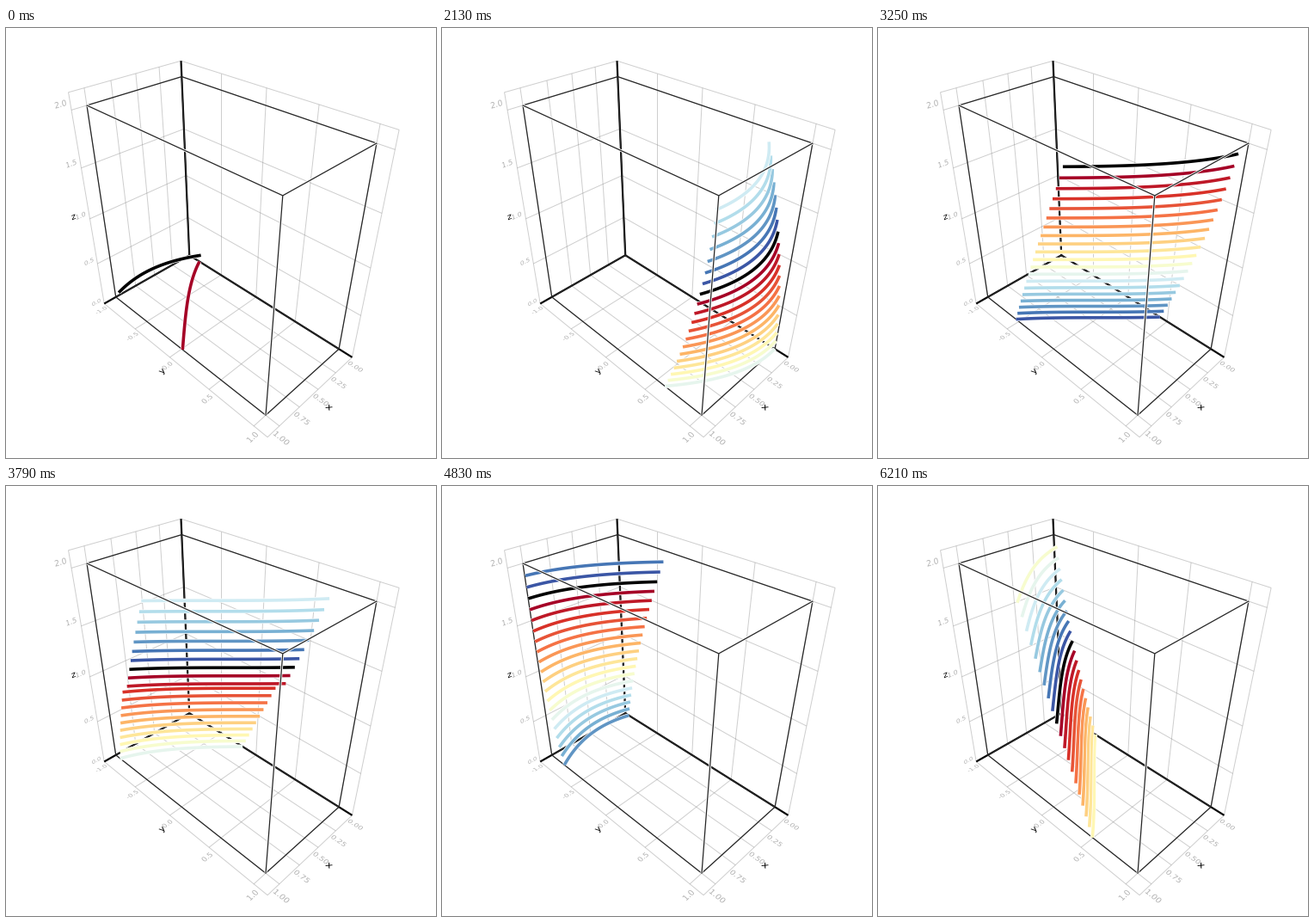
Animation, 500 px wide and 500 px high, one loop 6250 ms. Source, as a matplotlib script:

```python
import itertools

import numpy as np
import matplotlib
import matplotlib.pyplot as plt
from matplotlib import patheffects
from matplotlib.animation import FuncAnimation
from matplotlib.collections import LineCollection
from matplotlib.patches import PathPatch
from matplotlib.path import Path
from matplotlib.textpath import TextPath

SIZE, DPI = 500, 100
PX = 72 / DPI  # one pixel in points
LOOP_MS, TICK_MS = 6250, 25
STEP_RATE = 24  # wave steps per second
TRAIL, RISE = 20, 0.1

LOW = np.array([0.0, -1.0, 0.0])
HIGH = np.array([1.0, 1.0, 2.0])
LIMIT = HIGH + 0.14

# Perspective camera looking down the (1, 1, 1) diagonal
FOCAL, DISTANCE = 616, 4.403
FOCUS = np.array([0.57, 0.07, 0.9875])
RIGHT = np.array([-1, 1, 0]) / np.sqrt(2)
UP = np.array([-1, -1, 2]) / np.sqrt(6)
TOWARD = np.ones(3) / np.sqrt(3)

X, Y, Z = np.eye(3)


def project(points):
    rel = np.atleast_2d(points) - FOCUS
    scale = FOCAL / (DISTANCE - rel @ TOWARD)
    return np.c_[SIZE / 2 + scale * (rel @ RIGHT),
                 SIZE / 2 - scale * (rel @ UP)]


fig = plt.figure(figsize=(SIZE / DPI, SIZE / DPI), dpi=DPI, facecolor="white")
ax = fig.add_axes([0, 0, 1, 1])
ax.set_xlim(0, SIZE)
ax.set_ylim(SIZE, 0)
ax.axis("off")


def halo(width):
    return [patheffects.Stroke(linewidth=width * PX, foreground="white"),
            patheffects.Normal()]


def draw_segments(ends, color, width, zorder, **style):
    ax.add_collection(LineCollection([project(pair) for pair in ends], colors=color,
                                     linewidths=width * PX, zorder=zorder, **style))


def flat_text(text, center, right, up, em):
    """Outline of text lying in the plane spanned by right and up."""
    path = TextPath((0, 0), text, size=em)
    box = path.get_extents()
    flat = path.vertices - [(box.x0 + box.x1) / 2, (box.y0 + box.y1) / 2]
    return Path(project(center + flat @ np.array([right, up])), path.codes)


def draw_texts(paths, color):
    ax.add_patch(PathPatch(Path.make_compound_path(*paths),
                           fc=color, ec="none", zorder=3))


def draw_grid():
    lines = []
    for i, j in itertools.permutations(range(3), 2):
        for tick in [*np.linspace(LOW[i], HIGH[i], 5), LIMIT[i]]:
            start = LOW.copy()
            start[i] = tick
            end = start.copy()
            end[j] = LIMIT[j]
            lines.append((start, end))
    draw_segments(lines, (0.5, 0.5, 0.5, 0.38), 1.0, 1)
    axes = [(LOW, np.where(axis, LIMIT, LOW)) for axis in np.eye(3, dtype=bool)]
    draw_segments(axes, "#0a0a0a", 2.2, 2)


def draw_labels():
    em, ticks = 0.064, []
    for s in np.linspace(0, 1, 5):
        x, y, z = LOW + s * (HIGH - LOW)
        ticks += [flat_text(f"{x:.2f}", (x + 0.07, 1.22, 0), Y, -X, em),
                  flat_text(f"{y:.1f}", (1.22, y + 0.058, 0), -X, -Y, em),
                  flat_text(f"{z:.1f}", (1.222, -1, z + 0.07), -X, Z, em)]
    draw_texts(ticks, "#b0b0b0")
    em = 0.082
    draw_texts([flat_text("x", (0.585, 1.31, 0), Y, -X, em),
                flat_text("y", (1.29, 0.084, 0), -X, -Y, em),
                flat_text("z", (1.29, -1, 1.085), -X, Z, em)], "black")


def draw_box():
    corners = np.array(list(itertools.product(*zip(LOW, HIGH))))
    edges = [(a, b) for a, b in itertools.combinations(corners, 2)
             if np.count_nonzero(a != b) == 1]
    near = [e for e in edges if np.array_equal(e[1], HIGH)]
    far = [e for e in edges if not np.array_equal(e[1], HIGH)]
    draw_segments(far, "#262626", 1.25, 4)
    draw_segments(near, "#262626", 1.25, 50, path_effects=halo(3.0))


draw_grid()
draw_labels()
draw_box()

# The wave follows a real-time clock that stalls now and then: (step, seconds)
START = -2.158
STALLS = [(0, 1.17), (1, 0.17), (19, 0.08), (20, 0.12), (55, 0.085), (82, 0.07), (125, 0.053)]

U = np.linspace(0, 1, 100)
COLORS = ["black", *matplotlib.colormaps["RdYlBu"](np.linspace(0, 1, TRAIL))[:-1]]
curves = [ax.plot([], [], lw=3.6 * PX, solid_capstyle="butt", zorder=10 + age,
                  path_effects=halo(5.0))[0] for age in range(TRAIL)]


def phase(step):
    return START + step / STEP_RATE + sum(lag for at, lag in STALLS if step >= at)


def update(frame):
    # latest wave step that begins within this tick
    step = (3 * frame + 2) // 5
    for age, curve in enumerate(curves):
        born = step - age
        if born < -1:
            curve.set_data([], [])
            continue
        xy = project(np.c_[U, np.sin(U + phase(born)), np.full_like(U, RISE * age)])
        curve.set_data(xy[:, 0], xy[:, 1])
        curve.set_color(COLORS[(born + 1) % TRAIL])
    return curves


anim = FuncAnimation(fig, update, frames=LOOP_MS // TICK_MS, interval=TICK_MS,
                     repeat=True, repeat_delay=0, blit=False)
plt.show()
```
